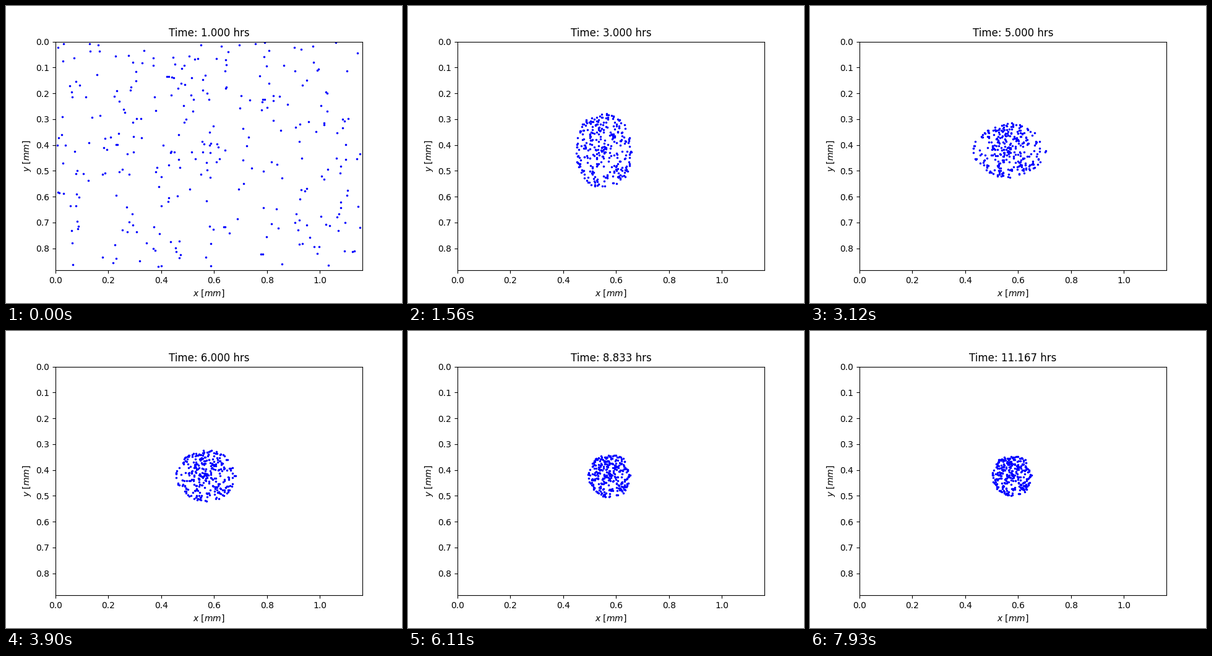
Recreate the animation shown at these times as a matplotlib script. Size 640 by 480 pixels, loop 8 s.

```python
import numpy as np
import matplotlib.pyplot as plt
from matplotlib.animation import FuncAnimation

W, H = 1.161, 0.8855           # field of view, mm
FLOOR = 0.872                  # lowest starting dot
COUNT = 300
STEP, TICK, LOOP = 130, 40, 8000
LAST = LOOP // STEP
GATHER = 12                    # steps until the cluster has formed

rng = np.random.default_rng(5)
x0 = rng.uniform(.008, W - .008, COUNT)
y0 = rng.uniform(.003, FLOOR, COUNT)
phase = rng.uniform(0, 2 * np.pi, (2, COUNT))

# direction and relative radius of each dot; the outermost line the rim
a, b = 2 * x0 / W - 1, 2 * y0 / FLOOR - 1
angle = np.arctan2(b, a)
cos, sin = np.cos(angle), np.sin(angle)
rho = np.minimum(1, 1.08 * np.maximum(abs(a), abs(b)))


def superellipse(rx, ry, p):
    r = rho / (abs(cos) ** p + abs(sin) ** p) ** (1 / p)
    return np.array([rx * r * cos, ry * r * sin])


def positions(n):
    age = max(0, n - GATHER)
    settle = np.exp(-age / 18)
    t = age / 6
    flare = t * np.exp(1 - t)          # wings grow, then fade
    rx, ry = .069 + .034 * settle, .070 + .070 * settle
    body = superellipse(rx, ry, 2.2)
    outer = superellipse(rx + .07 * flare, ry, 2.2 - 1.05 * flare ** 2)
    cx, cy = .578 - .025 * settle, .422
    wobble = .003 * np.sin(.45 * n + phase)
    x, y = body + (outer - body) * rho ** 8 + wobble
    x, y = x + cx, y + cy
    spread = max(0, 1 - n / GATHER) ** 1.65
    return x + (x0 - x) * spread, y + (y0 - y) * spread


fig, ax = plt.subplots(figsize=(6.4, 4.8), dpi=100)
dots, = ax.plot([], [], 'b.', markersize=3)
ax.set(xlim=(0, W), ylim=(H, 0), xlabel='$x$ $[mm]$', ylabel='$y$ $[mm]$')
title = ax.set_title('')


def draw(i):
    n = min((i * TICK + TICK - 1) // STEP, LAST)
    dots.set_data(*positions(n))
    title.set_text(f'Time: {1 + n / 6:.3f} hrs')
    return dots, title


anim = FuncAnimation(fig, draw, frames=LOOP // TICK, interval=TICK,
                     repeat=True, repeat_delay=0)
plt.show()
```
